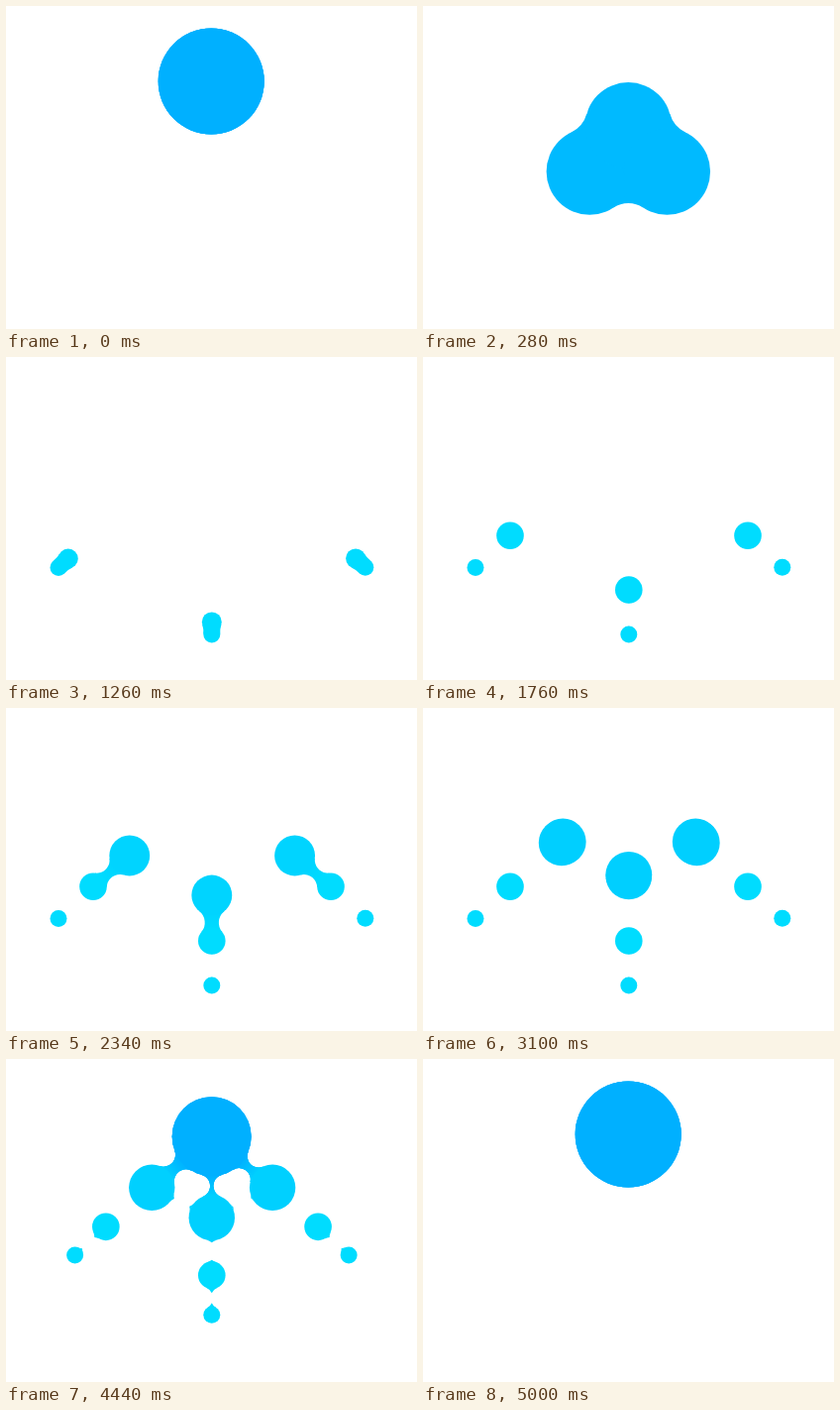
Write an HTML page with a canvas that moves like this. It is 415 px wide and 326 px high and loops after 5.02 s.

```html
<!DOCTYPE html>
<html lang="en">
<head>
<meta charset="utf-8">
<title>Liquid dots</title>
<style>
  html, body { margin: 0; width: 100%; height: 100%; overflow: hidden; background: #fff; }
  canvas { display: block; width: 415px; height: 326px; }
</style>
</head>
<body>
<canvas id="stage"></canvas>
<script>
const WIDTH = 415, HEIGHT = 326, LOOP = 5020, COLLAPSE = 4180;
const canvas = document.getElementById('stage');
const ctx = canvas.getContext('2d');
const ratio = window.devicePixelRatio || 1;
canvas.width = WIDTH * ratio;
canvas.height = HEIGHT * ratio;
ctx.scale(ratio, ratio);

const HUB = { x: 207.8, y: 79, r: 35.7, g: 176 };
const FULL = { x: 207.2, y: 76, r: 53.5, g: 176 };

// Dots of an arm from the outside in; "g" is the green channel of rgb(0, g, 255).
const makeArm = (points, control) => ({
  control,
  dots: [...points.map(([x, y], i) => ({ x, y, r: [8.5, 13.8, 23.2][i], g: [220, 220, 208][i] })), HUB]
});
const arms = [
  makeArm([[53, 212.5], [88, 180.3], [140, 136]], [115, 323]),
  makeArm([[207.8, 280], [207.8, 235], [207.8, 170]], [207.5, 178]),
  makeArm([[362.8, 212.3], [328, 180.3], [276.5, 136]], [300, 323])
];
const births = [[-20, 710], [945, 710], [1950, 710], [2890, 820]];

const clamp = v => Math.min(1, Math.max(0, v));
const mix = (a, b, p) => a + (b - a) * p;
const quint = u => u < 0.5 ? 16 * u ** 5 : 1 - 16 * (1 - u) ** 5;
const smooth = u => u * u * (3 - 2 * u);
const blend = (a, b, p) => ({
  x: mix(a.x, b.x, p), y: mix(a.y, b.y, p), r: mix(a.r, b.r, p), g: mix(a.g, b.g, p)
});
const color = g => `rgb(0,${Math.round(g)},255)`;

function bend(a, c, b, p) {
  return mix(mix(a, c, p), mix(c, b, p), p);
}

function dotsAt(t) {
  const result = [];
  const pull = quint(clamp((t - COLLAPSE) / 710));
  const swell = smooth(clamp((t - COLLAPSE) / 820));
  const hub = blend(HUB, FULL, swell);
  births.forEach(([start, length], level) => {
    if (t < start) return;
    const p = quint(clamp((t - start) / length));
    for (const { dots, control } of arms) {
      const end = dots[level];
      let dot = blend(level ? dots[level - 1] : FULL, end, p);
      if (!level) {
        dot.x = bend(FULL.x, control[0], end.x, p);
        dot.y = bend(FULL.y, control[1], end.y, p);
      }
      if (t > COLLAPSE) {
        dot = level === 3 ? hub : { ...dot, x: mix(dot.x, hub.x, pull), y: mix(dot.y, hub.y, pull) };
      }
      result.push(dot);
    }
  });
  return result;
}

// Fills the gap between two dots with arcs tangent to both; a broken neck leaves two cusps.
function drawNeck(a, b) {
  const dx = b.x - a.x, dy = b.y - a.y, dist = Math.hypot(dx, dy);
  const gap = dist - a.r - b.r;
  if (dist <= Math.abs(a.r - b.r) + 0.3) return;
  const d = Math.min(30, 11.5 + Math.max(0, 17 - gap) * 0.6);
  if (gap >= 2 * d) return;

  const ra = a.r + d, rb = b.r + d;
  const x = (dist * dist + ra * ra - rb * rb) / (2 * dist);
  const h = Math.sqrt(Math.max(0, ra * ra - x * x));
  const ax = x * a.r / ra, ay = h * a.r / ra;
  const bx = dist + (x - dist) * b.r / rb, by = h * b.r / rb;
  const angle = (px, py) => Math.atan2(py - h, px - x);
  const fromA = angle(ax, ay), fromB = angle(bx, by);

  ctx.save();
  ctx.translate(a.x, a.y);
  ctx.rotate(Math.atan2(dy, dx));
  const fill = ctx.createLinearGradient(ax, 0, bx, 0);
  fill.addColorStop(0, color(a.g));
  fill.addColorStop(1, color(b.g));
  ctx.fillStyle = fill;
  ctx.beginPath();
  if (h >= d) {
    ctx.arc(x, h, d, fromA, fromB);
    ctx.arc(x, -h, d, -fromB, -fromA);
    ctx.closePath();
  } else {
    const reach = Math.sqrt(d * d - h * h);
    const tipA = angle(x - reach, 0), tipB = angle(x + reach, 0);
    ctx.arc(x, h, d, fromA, tipA);
    ctx.arc(x, -h, d, -tipA, -fromA);
    ctx.closePath();
    ctx.moveTo(x + reach, 0);
    ctx.arc(x, h, d, tipB, fromB);
    ctx.arc(x, -h, d, -fromB, -tipB);
    ctx.closePath();
  }
  ctx.fill();
  ctx.restore();
}

function drawDot({ x, y, r, g }) {
  ctx.fillStyle = color(g);
  ctx.beginPath();
  ctx.arc(x, y, r, 0, Math.PI * 2);
  ctx.fill();
}

function render(t) {
  ctx.fillStyle = '#fff';
  ctx.fillRect(0, 0, WIDTH, HEIGHT);
  const dots = dotsAt(t);
  dots.forEach((a, i) => dots.slice(i + 1).forEach(b => drawNeck(a, b)));
  dots.forEach(drawDot);
}

const begin = performance.now();
function tick(now) {
  render(Math.max(0, now - begin) % LOOP);
  requestAnimationFrame(tick);
}
render(0);
requestAnimationFrame(tick);
</script>
</body>
</html>
```
